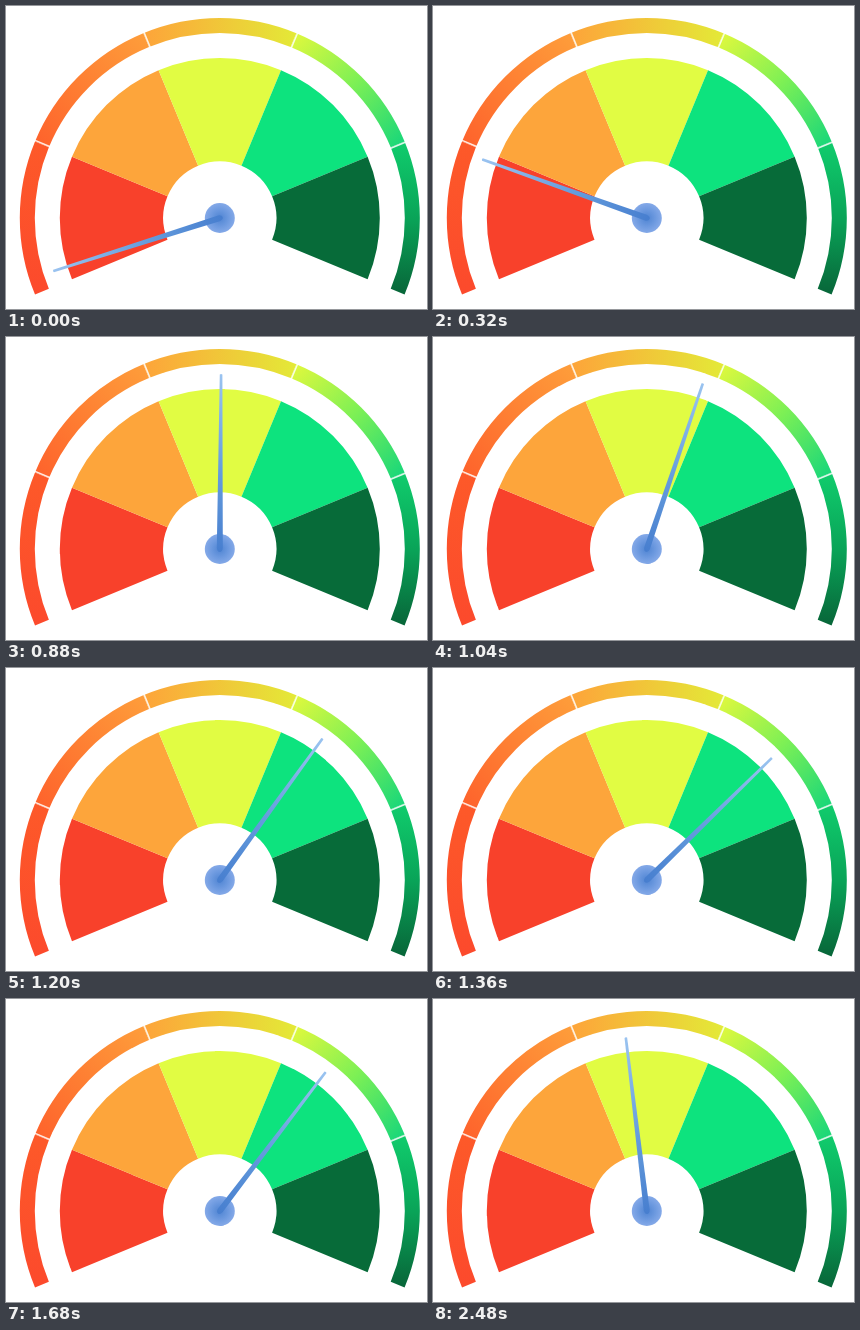
An HTML page for the animation above (2.56 s loop, 421 by 303 pixels).

```html
<!DOCTYPE html>
<html lang="en">
<head>
<meta charset="utf-8">
<title>Gauge</title>
<style>
  html, body { margin: 0; width: 100%; height: 100%; overflow: hidden; background: #fff; }
  svg { display: block; width: 100%; height: 100%; }
</style>
</head>
<body>
<svg viewBox="0 0 421 303">
  <defs id="defs">
    <linearGradient id="blade" gradientUnits="userSpaceOnUse" x1="0" y1="-175" x2="0" y2="3">
      <stop offset="0" stop-color="#9ac3f0"/>
      <stop offset=".55" stop-color="#659ddd"/>
      <stop offset="1" stop-color="#477ecf"/>
    </linearGradient>
    <radialGradient id="hub">
      <stop offset="0" stop-color="#4f84d2"/>
      <stop offset=".5" stop-color="#6997de"/>
      <stop offset="1" stop-color="#84a9e8"/>
    </radialGradient>
  </defs>
  <g transform="translate(213.8 212)">
    <g id="dial"></g>
    <circle r="15" fill="url(#hub)"/>
    <path id="needle" d="M-1.3-174.5Q0-175.5 1.3-174.5L3-1Q2.5 3 0 3Q-2.5 3-3-1Z" fill="url(#blade)"/>
  </g>
</svg>
<script>
const NS = 'http://www.w3.org/2000/svg';
const STEP = 80, LOOP = 2560;
const dial = document.getElementById('dial');
const defs = document.getElementById('defs');
const needle = document.getElementById('needle');

function add(parent, tag, attrs) {
  const el = document.createElementNS(NS, tag);
  for (const k in attrs) el.setAttribute(k, attrs[k]);
  return parent.appendChild(el);
}

// Angles are degrees clockwise from straight up.
function polar(r, deg) {
  const a = deg * Math.PI / 180;
  return [(r * Math.sin(a)).toFixed(2), (-r * Math.cos(a)).toFixed(2)];
}

function sector(r0, r1, a, b, fill) {
  const d = `M${polar(r1, a)}A${r1} ${r1} 0 0 1 ${polar(r1, b)}` +
    `L${polar(r0, b)}A${r0} ${r0} 0 0 0 ${polar(r0, a)}Z`;
  add(dial, 'path', { d, fill });
}

const wedges = ['#f8412b', '#fda53b', '#e1fc43', '#0de37e', '#076b39'];
const rim = [
  ['#fc4a2c', '#fd5929'], ['#fe642c', '#fe9c3a'], ['#fda53a', '#e4e837'],
  ['#dbf83e', '#7df055', '#1dd878'], ['#10cb6c', '#09a458', '#08683a']
];

wedges.forEach((color, i) => {
  const a = -112.5 + 45 * i, b = a + 45;
  sector(56.6, 160, a, b, color);
  const [x1, y1] = polar(192, a), [x2, y2] = polar(192, b);
  const grad = add(defs, 'linearGradient',
    { id: 'rim' + i, gradientUnits: 'userSpaceOnUse', x1, y1, x2, y2 });
  const last = rim[i].length - 1;
  rim[i].forEach((c, k) => add(grad, 'stop', { offset: k / last, 'stop-color': c }));
  sector(185, 200, a, b, `url(#rim${i})`);
});

for (let a = -67.2; a < 90; a += 45) {
  add(dial, 'path', {
    d: `M${polar(184, a)}L${polar(201, a)}`,
    stroke: '#fff', 'stroke-width': 1.5, 'stroke-opacity': 0.85
  });
}

// Swing keys: step, angle, slope per step.
const keys = [
  [0, -107.7, 8.6], [4, -70.4, 10.1], [8, -29, 9.8],
  [13, 18.7, 8.6], [17, 45.7, 1], [21, 37.3, -0.8]
];

function angleAt(step) {
  if (step >= 31) return -6.9;
  if (step >= 21) return 37.3;
  const i = keys.findIndex(k => k[0] > step);
  const [s0, a0, m0] = keys[i - 1], [s1, a1, m1] = keys[i];
  const h = s1 - s0, u = (step - s0) / h, v = 1 - u;
  return a0 * (1 + 2 * u) * v * v + m0 * h * u * v * v +
    a1 * u * u * (3 - 2 * u) - m1 * h * u * u * v;
}

function draw(ms) {
  const step = Math.floor((ms % LOOP) / STEP);
  needle.setAttribute('transform', `rotate(${angleAt(step).toFixed(2)})`);
}

const start = performance.now();
function tick() {
  draw(performance.now() - start);
  requestAnimationFrame(tick);
}
tick();
</script>
</body>
</html>
```
